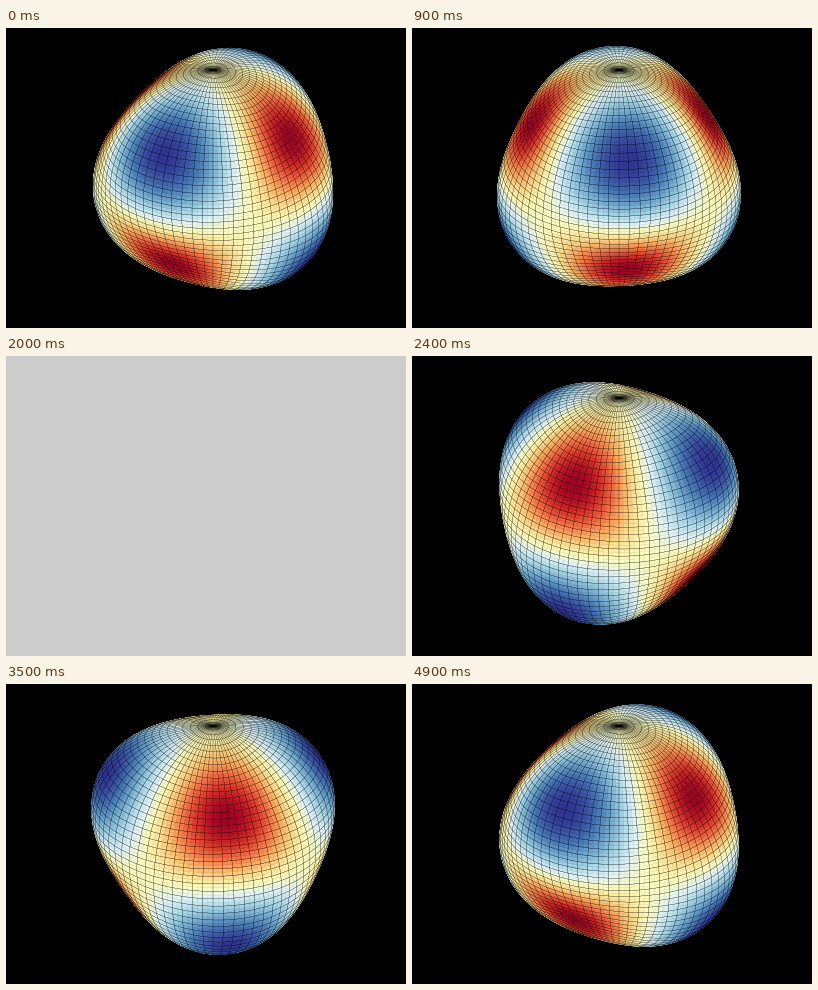
A matplotlib script for the animation above (5 s loop, 400 by 300 pixels).

```python
"""A sphere deformed by a travelling l=3, m=2 spherical harmonic."""
import numpy as np
import matplotlib.pyplot as plt
from matplotlib.animation import FuncAnimation
from matplotlib.collections import PolyCollection

WIDTH, HEIGHT, DPI = 400, 300, 100
FRAMES, INTERVAL = 50, 100
BLANK_FRAME = 20
CENTER = np.array([207, 155.5])
RADIUS, AMPLITUDE = 118.4, 0.1
ELEVATION = np.radians(30)
START = np.radians(-27)
ROWS, COLUMNS = 49, 72
SHADING = 2  # colour patches per grid cell, each way


def harmonic(theta, phi):
    """Real harmonic scaled to the range -1 to 1."""
    return 1.5 * np.sqrt(3) * np.cos(theta) * np.sin(theta) ** 2 * np.cos(2 * phi)


def sphere_grid(rows, columns):
    return np.meshgrid(np.linspace(0, np.pi, rows + 1),
                       np.linspace(0, 2 * np.pi, columns + 1), indexing="ij")


def quads(grid):
    """Corner values of every grid cell, in order around the cell."""
    corners = grid[:-1, :-1], grid[1:, :-1], grid[1:, 1:], grid[:-1, 1:]
    return np.stack(corners, axis=-1).reshape(-1, 4)


def visible_cells(theta, phi, turn):
    """Front-facing cells on screen, far to near, with their indices."""
    r = RADIUS * (1 + AMPLITUDE * harmonic(theta, phi - turn))
    toward = r * np.sin(theta) * np.cos(phi)
    height = r * np.cos(theta)
    x = quads(r * np.sin(theta) * np.sin(phi))
    y = quads(height * np.cos(ELEVATION) - toward * np.sin(ELEVATION))
    depth = quads(toward * np.cos(ELEVATION) + height * np.sin(ELEVATION)).mean(axis=1)
    area = np.sum(x * np.roll(y, -1, axis=1) - y * np.roll(x, -1, axis=1), axis=1)
    order = np.argsort(depth)
    order = order[area[order] > 0]
    return np.stack([x, y], axis=-1)[order] + CENTER, order


mesh = sphere_grid(ROWS, COLUMNS)
patches = sphere_grid(SHADING * ROWS, SHADING * COLUMNS)
patch_theta, patch_phi = (quads(grid).mean(axis=1) for grid in patches)

fig = plt.figure(figsize=(WIDTH / DPI, HEIGHT / DPI), dpi=DPI, facecolor="black")
ax = fig.add_axes([0, 0, 1, 1], xlim=(0, WIDTH), ylim=(0, HEIGHT),
                  xticks=[], yticks=[])
ax.spines[:].set_visible(False)
surface = PolyCollection([], edgecolors="face", linewidths=0.3)
# Neighbouring cells share edges, so every line is stroked twice.
wires = PolyCollection([], facecolors="none", edgecolors="black", linewidths=0.12)
for collection in (surface, wires):
    ax.add_collection(collection, autolim=False)


def update(frame):
    blank = frame == BLANK_FRAME
    background = "0.8" if blank else "black"
    fig.set_facecolor(background)
    ax.set_facecolor(background)
    surface.set_visible(not blank)
    wires.set_visible(not blank)

    turn = START + np.pi * frame / FRAMES
    cells, order = visible_cells(*patches, turn)
    value = harmonic(patch_theta[order], patch_phi[order] - turn)
    surface.set_verts(cells)
    surface.set_facecolor(plt.cm.RdYlBu((value + 1) / 2))
    wires.set_verts(visible_cells(*mesh, turn)[0])
    return [surface, wires]


anim = FuncAnimation(fig, update, frames=FRAMES, interval=INTERVAL,
                     init_func=lambda: update(0), repeat=True, repeat_delay=0)
plt.show()
```
